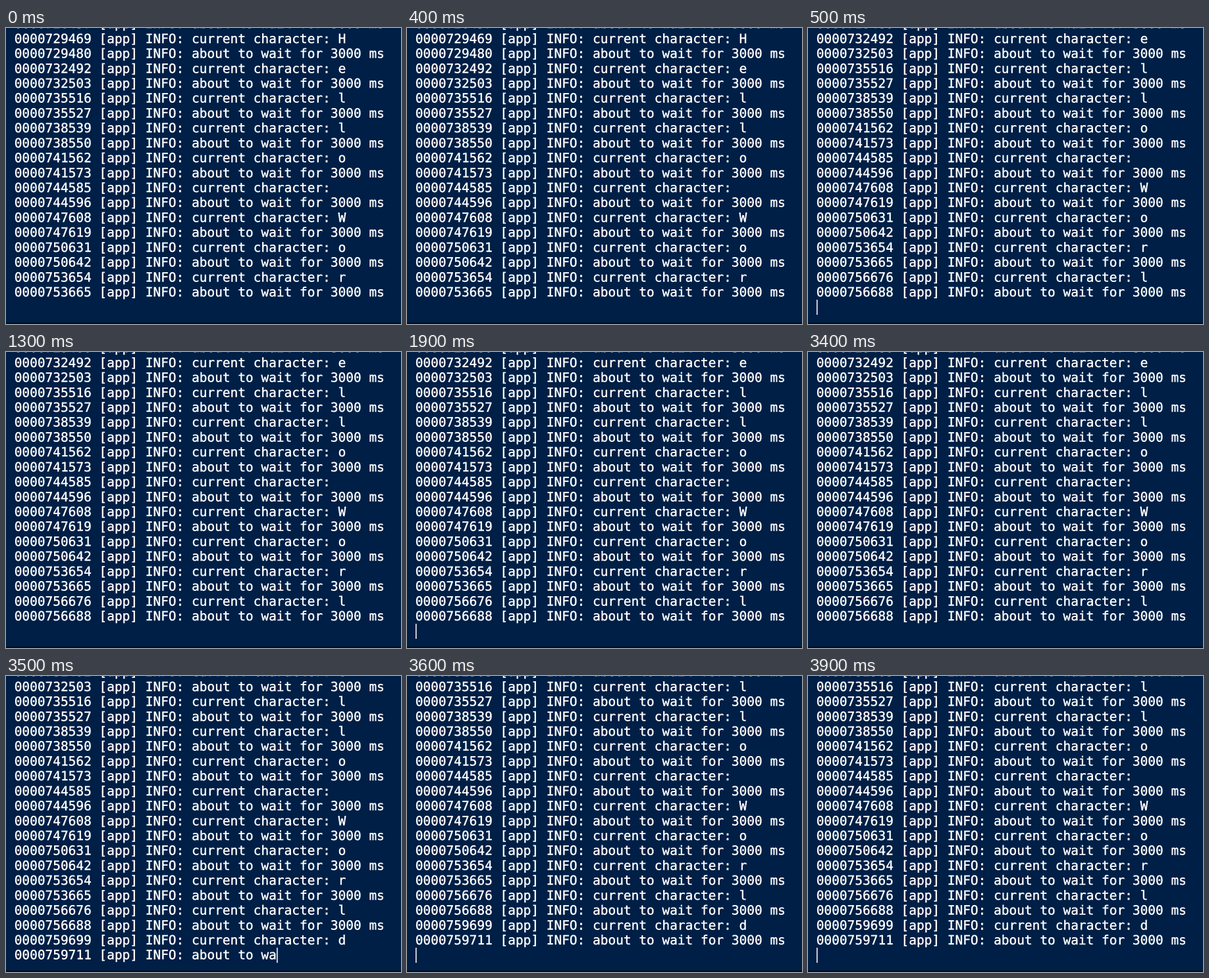
Write an HTML page with a canvas that moves like this. It is 600x451 px and loops after 4000 ms.

```html
<!DOCTYPE html>
<html lang="en">
<head>
<meta charset="utf-8">
<title>Serial log</title>
<style>
html, body { margin: 0; height: 100%; overflow: hidden; background: #001f46; }
canvas { display: block; width: 600px; height: 451px; }
</style>
</head>
<body>
<canvas id="stage" width="1200" height="902"></canvas>
<script>
// Drawn at double density so that text keeps its fractional row positions.
const ctx = document.getElementById('stage').getContext('2d');
ctx.scale(2, 2);
const LOOP = 4000, LEFT = 12.7, ROW = 22.71, BASE = 22.9, LAST_ROW = 17;

// Time stamp of each printed character; the wait line follows some ms later.
const stamps = [726446, 729469, 732492, 735516, 738539, 741562,
                744585, 747608, 750631, 753654, 756676, 759699];
const log = stamps.flatMap((ms, i) => [
  entry(ms, 'current character: ' + ' Hello World'[i]),
  entry(ms + (ms > 756000 ? 12 : 11), 'about to wait for 3000 ms')
]);

function entry(ms, message) {
  return String(ms).padStart(10, '0') + ' [app] INFO: ' + message;
}

// Number of finished lines, the line being printed and the cursor state.
function stateAt(t) {
  if (t < 500) return { done: 20, typed: '', cursor: false };
  const cursor = Math.floor(t / 500) % 2 === 1;
  if (t < 3500) return { done: 22, typed: '', cursor };
  if (t < 3600) return { done: 23, typed: log[23].slice(0, 34), cursor };
  return { done: 24, typed: '', cursor };
}

function print(text, row) {
  const y = BASE + row * ROW;
  ctx.fillText(text, LEFT, y);
  ctx.strokeText(text, LEFT, y);
}

function draw(t) {
  const { done, typed, cursor } = stateAt(t);
  ctx.fillStyle = '#001f46';
  ctx.fillRect(0, 0, 600, 451);
  ctx.fillStyle = '#000d20';
  ctx.fillRect(0, 449, 600, 2);

  ctx.font = '19.47px "DejaVu Sans Mono", monospace';
  ctx.textRendering = 'geometricPrecision';
  ctx.fillStyle = ctx.strokeStyle = '#fff';
  ctx.lineWidth = 0.4;
  ctx.lineJoin = 'round';
  for (let row = -1; row <= LAST_ROW; row++) {
    print(log[done - 1 - LAST_ROW + row], row);
  }
  print(typed, LAST_ROW + 1);
  if (cursor) {
    ctx.fillRect(LEFT + ctx.measureText(typed).width + 0.3, 414, 1.5, 23);
  }
}

function frame() {
  draw(performance.now() % LOOP);
  requestAnimationFrame(frame);
}
frame();
</script>
</body>
</html>
```
